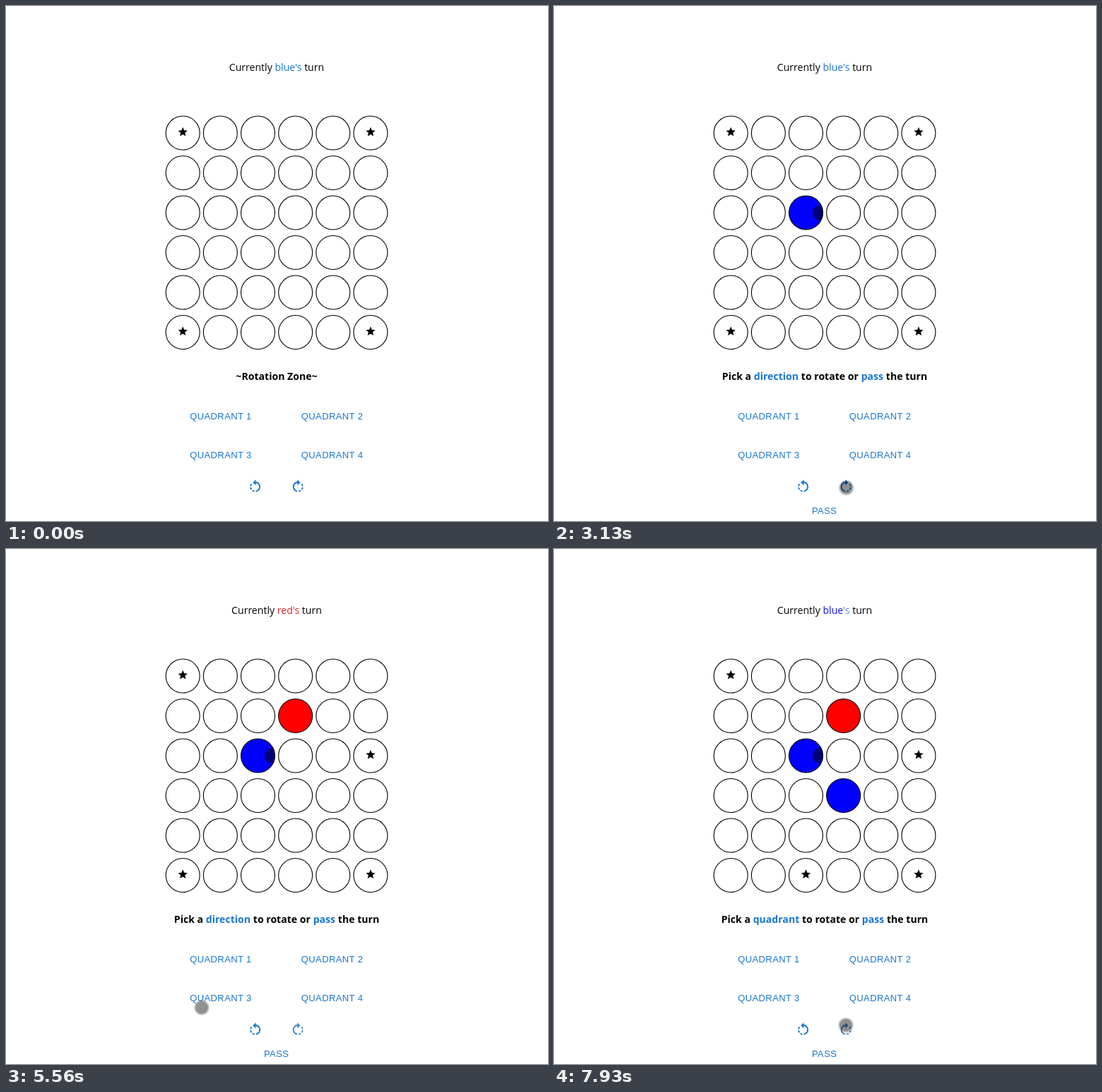
These frames come from a looping animation (767x730 px, 8 s). An HTML page:

```html
<!DOCTYPE html>
<html lang="en">
<head>
<meta charset="utf-8">
<title>Rotation board game</title>
<style>
  html, body { margin: 0; width: 100%; height: 100%; overflow: hidden; background: #fff; }
  svg { display: block; width: 767px; height: 730px; }
  .line { font: 14.1px "Open Sans", "Noto Sans", sans-serif; text-anchor: middle; }
  .bold { font-weight: 700; }
  .button { font: 13px "Liberation Sans", Arial, sans-serif; letter-spacing: .4px; }
  .button, .key, .icon, .ripple { fill: #1976d2; }
  .cell { fill: none; stroke: #000; stroke-width: 1.1; }
</style>
</head>
<body>
<svg viewBox="0 0 767 730" xmlns="http://www.w3.org/2000/svg">
  <defs>
    <path id="star" d="M12 17.27 18.18 21l-1.64-7.03L22 9.24l-7.19-.61L12 2 9.19 8.63 2 9.24l5.46 4.73L5.82 21z"/>
    <path id="turn" d="M7.11 8.53 5.7 7.11C4.8 8.27 4.24 9.61 4.07 11h2.02c.14-.87.49-1.72 1.02-2.47zM6.09 13H4.07c.17 1.39.72 2.73 1.62 3.89l1.41-1.42c-.52-.75-.87-1.59-1.01-2.47zm1.01 5.32c1.16.9 2.51 1.44 3.9 1.61V17.9c-.87-.15-1.71-.49-2.46-1.03L7.1 18.32zM13 4.07V1L8.45 5.55 13 10V6.09c2.84.48 5 2.94 5 5.91s-2.16 5.43-5 5.91v2.02c3.95-.49 7-3.85 7-7.93s-3.05-7.44-7-7.93z"/>
    <clipPath id="disc"><circle cx="356.5" cy="293" r="24"/></clipPath>
  </defs>

  <g id="titles" class="line">
    <text x="383" y="92">Currently <tspan class="key">blue's</tspan> turn</text>
    <text x="383" y="92">Currently <tspan fill="#e3211f">red's</tspan> turn</text>
    <text x="383" y="92">Currently <tspan fill="#1010ee">blue</tspan><tspan fill="#5c8ee0">'s</tspan> turn</text>
  </g>

  <g id="board"></g>
  <circle id="shade" cx="376.5" cy="293" r="10.8" fill-opacity=".53" clip-path="url(#disc)"/>

  <g id="hints" class="line bold">
    <text x="383" y="530">~Rotation Zone~</text>
    <text x="383" y="530">Pick a <tspan class="key">quadrant</tspan> to rotate or <tspan class="key">pass</tspan> the turn</text>
    <text x="383" y="530">Pick a <tspan class="key">direction</tspan> to rotate or <tspan class="key">pass</tspan> the turn</text>
  </g>

  <g id="ripples"></g>
  <g id="buttons" class="button">
    <text id="pass" x="365" y="719.5">PASS</text>
  </g>
  <use class="icon" href="#turn" transform="translate(352.6 681.4) scale(.93) translate(-12 -12)"/>
  <use class="icon" id="right" href="#turn" transform="translate(413.2 681.4) scale(-.93 .93) translate(-12 -12)"/>

  <g id="cursor">
    <circle r="10.8" fill-opacity=".2"/>
    <circle r="9" fill-opacity=".29"/>
  </g>
</svg>

<script>
const LOOP = 8000;

// Each turn has three phases: place a disc, pick a quadrant, pick a direction.
const phases = [0, 1150, 1760, 3200, 4250, 5560, 6120, 6950];

// Pointer moves: departure, arrival, x, y.
const home = [695, 705];
const moves = [
  [260, 820, 376, 293], [1400, 1560, 477, 579], [1900, 2170, 434, 676], [2170, 2560, 401, 713],
  [2960, 3150, 414, 682], [3480, 3830, 423, 268], [3830, 3970, 411, 241], [4330, 4640, 470, 535],
  [4670, 5430, 277, 650], [5700, 6000, 340, 674], [6350, 6540, 364, 649], [6540, 6800, 412, 362],
  [7080, 7450, 428, 480], [7450, 7750, 353, 668], [7750, 7930, 413, 675]
];

const $ = id => document.getElementById(id);
const clamp = v => Math.max(0, Math.min(1, v));
const ease = v => v * v * (3 - 2 * v);
const show = (el, on) => el.setAttribute("visibility", on ? "visible" : "hidden");
const showOnly = (group, index) => [...group.children].forEach((el, i) => show(el, i === index));

function add(parent, tag, attrs) {
  const el = document.createElementNS("http://www.w3.org/2000/svg", tag);
  for (const name in attrs) el.setAttribute(name, attrs[name]);
  return parent.appendChild(el);
}

function pointer(t) {
  let [x, y] = home;
  for (const [from, to, nextX, nextY] of moves) {
    const k = ease(clamp((t - from) / (to - from)));
    x += (nextX - x) * k;
    y += (nextY - y) * k;
  }
  return [x, y];
}

// Board
const board = $("board");
const cellX = col => 250.2 + 53.15 * col;
const cellY = row => 180 + 56.5 * row;
const circle = (col, row, attrs) =>
  add(board, "circle", { cx: cellX(col), cy: cellY(row), r: 24, ...attrs });

const discs = [
  circle(2, 2, { fill: "#00f" }),
  circle(3, 1, { fill: "#f00" }),
  circle(3, 3, { fill: "#00f" })
];
for (let i = 0; i < 36; i++) circle(i % 6, Math.floor(i / 6), { class: "cell" });
const stars = [0, 1, 2, 3].map(() => add(board, "use", { href: "#star" }));

function placeStar(star, col, row) {
  star.setAttribute("transform",
    `translate(${cellX(col)} ${cellY(row) - 1.8}) scale(.67) translate(-12 -11.5)`);
}

// Buttons and their click ripples
const quadX = col => 225 + 157.6 * col;
const quadY = row => 555 + 54.9 * row;
for (let i = 0; i < 4; i++) {
  const label = add($("buttons"), "text", { x: quadX(i % 2) + 35.2, y: quadY(i >> 1) + 30.7 });
  label.textContent = "QUADRANT " + (i + 1);
}

const ripples = [];
function ripple(x, y, width, height, start) {
  const id = "box" + ripples.length;
  add(add($("ripples"), "clipPath", { id }), "rect", { x, y, width, height });
  const [cx, cy] = pointer(start);
  const el = add($("ripples"), "circle", { class: "ripple", cx, cy, "clip-path": `url(#${id})` });
  ripples.push({ el, start, size: 23 + .32 * width });
}
ripple(quadX(1), quadY(0), 158.5, 54, phases[2]);
ripple(383, 664, 58, 34, phases[3]);
ripple(quadX(0), quadY(1), 158.5, 54, phases[5]);
ripple(323, 664, 58, 34, phases[6]);

function draw(t) {
  const phase = phases.filter(start => t >= start).length - 1;
  const turn = Math.floor(phase / 3);
  showOnly($("titles"), turn);
  showOnly($("hints"), phase % 3);
  show($("pass"), phase > 0);
  show($("shade"), t >= moves[1][0]);
  show($("cursor"), t >= moves[0][0]);

  discs.forEach((disc, i) => show(disc, phase > 3 * i));
  placeStar(stars[0], 0, 0);
  placeStar(stars[1], 5, turn > 0 ? 2 : 0);
  placeStar(stars[2], turn > 1 ? 2 : 0, 5);
  placeStar(stars[3], 5, 5);

  for (const { el, start, size } of ripples) {
    const age = t - start;
    el.setAttribute("r", size * clamp(age / 300));
    el.setAttribute("opacity", .11 * clamp((650 - age) / 220));
  }
  $("right").style.fill = turn > 0 ? "#4a86bd" : "";
  $("cursor").setAttribute("transform", `translate(${pointer(t).join(" ")})`);
}

const begin = performance.now();
function tick() {
  draw((performance.now() - begin) % LOOP);
  requestAnimationFrame(tick);
}
tick();
</script>
</body>
</html>
```
